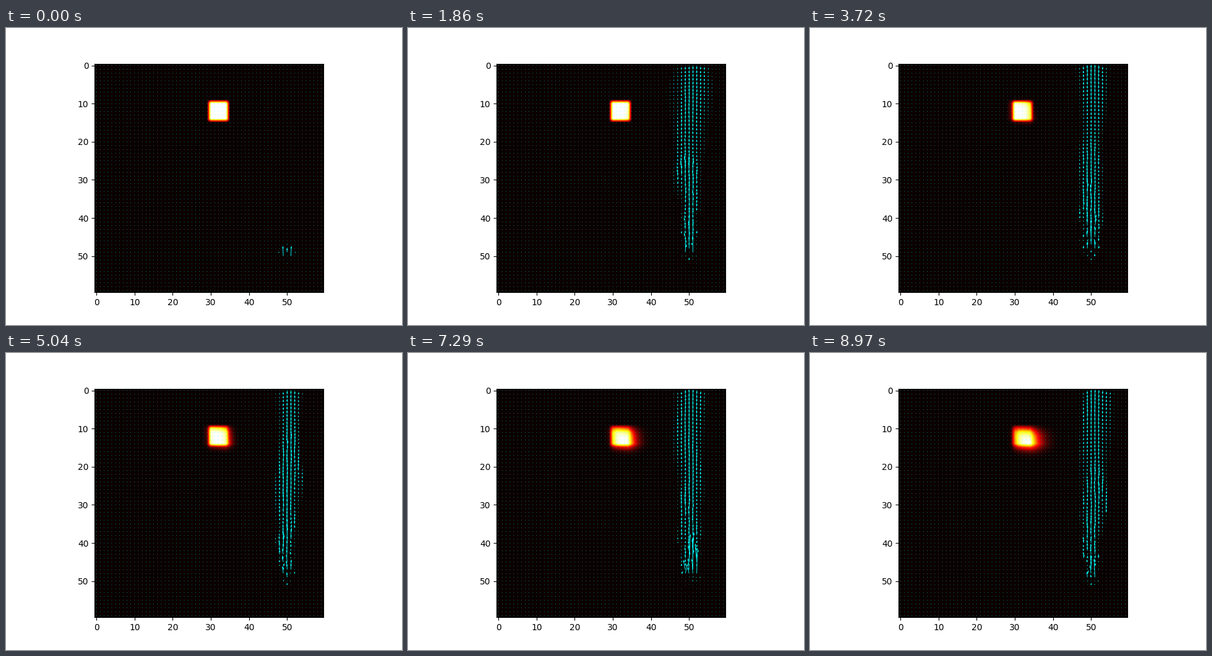
Animation, 640 px wide and 480 px high, one loop 9000 ms. Source, as a matplotlib script:

```python
"""A jet in a small grid fluid, beside a constantly fed block of hot dye."""
import numpy as np
import matplotlib.pyplot as plt
from matplotlib.animation import FuncAnimation
from matplotlib.patches import PathPatch
from matplotlib.path import Path

SIZE = 60
DT = 0.2
SOLVER_PASSES = 2
FRAMES = 300
INTERVAL = 30
WARMUP = 2
ARROW_WIDTH = 0.0024   # fraction of the axes width
ARROW_SCALE = 10

INNER = (slice(1, -1), slice(1, -1))
DOWN = (slice(2, None), slice(1, -1))
UP = (slice(None, -2), slice(1, -1))
RIGHT = (slice(1, -1), slice(2, None))
LEFT = (slice(1, -1), slice(None, -2))
ROWS, COLS = np.mgrid[1:SIZE - 1, 1:SIZE - 1]


def project(vr, vc):
    """Remove (roughly) the divergence of a velocity field in place."""
    div = np.zeros((SIZE, SIZE))
    p = np.zeros((SIZE, SIZE))
    div[INNER] = -0.5 * (vr[DOWN] - vr[UP] + vc[RIGHT] - vc[LEFT]) / SIZE
    for _ in range(SOLVER_PASSES):
        p[INNER] = (div[INNER] + (p[DOWN] + p[UP] + p[RIGHT] + p[LEFT])) * (1 / 6)
    vr[INNER] -= 0.5 * (p[DOWN] - p[UP]) * SIZE
    vc[INNER] -= 0.5 * (p[RIGHT] - p[LEFT]) * SIZE


def advect(fields, vr, vc):
    """Carry each field along the velocity by tracing cells backwards."""
    reach = DT * (SIZE - 2)
    r = np.clip(ROWS - reach * vr[INNER], 0.5, SIZE - 1.5)
    c = np.clip(COLS - reach * vc[INNER], 0.5, SIZE - 1.5)
    r0, c0 = np.floor(r).astype(int), np.floor(c).astype(int)
    r1, c1 = r0 + 1, c0 + 1
    s1, t1 = r - r0, c - c0
    s0, t0 = 1.0 - s1, 1.0 - t1
    moved = []
    for f in fields:
        out = np.zeros_like(f)
        out[INNER] = (s0 * (t0 * f[r0, c0] + t1 * f[r0, c1])
                      + s1 * (t0 * f[r1, c0] + t1 * f[r1, c1]))
        moved.append(out)
    return moved


def simulate(steps):
    dye, vr, vc = np.zeros((3, SIZE, SIZE))
    states = []
    for _ in range(steps):
        dye[10:15, 30:35] += 100
        vr[50, 50], vc[50, 50] = -2, 0
        project(vr, vc)
        vr, vc = advect((vr, vc), vr, vc)
        project(vr, vc)
        dye, = advect((dye,), vr, vc)
        states.append((dye.copy(), vr.copy(), vc.copy()))
    return states


def dot_path(x, y):
    """One compound path of tiny hexagons, as quiver draws for still cells."""
    turn = np.arange(8) * np.pi / 3
    radius = ARROW_WIDTH * SIZE / 2
    ring = radius * np.column_stack((np.cos(turn), np.sin(turn)))
    verts = np.column_stack((x, y))[:, None, :] + ring
    codes = [Path.MOVETO] + [Path.LINETO] * 7
    return Path(verts.reshape(-1, 2), np.tile(codes, len(x)))


states = simulate(FRAMES + WARMUP)[WARMUP - 1:]

# Only cells that ever move need arrows; the rest are static dots.
peak = np.max([np.hypot(vr, vc) for _, vr, vc in states], axis=0)
active = peak > 0.8 * ARROW_WIDTH * ARROW_SCALE
ys, xs = np.mgrid[:SIZE, :SIZE]

fig, ax = plt.subplots(figsize=(6.4, 4.8), dpi=100)
image = ax.imshow(states[0][0], cmap="hot", interpolation="bilinear")
ax.autoscale(False)
ax.add_patch(PathPatch(dot_path(xs[~active], ys[~active]),
                       facecolor="cyan", edgecolor="none", linewidth=0))
still = np.zeros(active.sum())
arrows = ax.quiver(xs[active], ys[active], still, still, color="cyan",
                   angles="xy", scale=ARROW_SCALE, units="width",
                   width=ARROW_WIDTH)


def update(i):
    dye, vr, vc = states[i]
    image.set_data(dye)
    image.autoscale()
    arrows.set_UVC(vc[active], vr[active])
    return image, arrows


anim = FuncAnimation(fig, update, frames=FRAMES, interval=INTERVAL,
                     repeat=True, repeat_delay=0)
plt.show()
```
